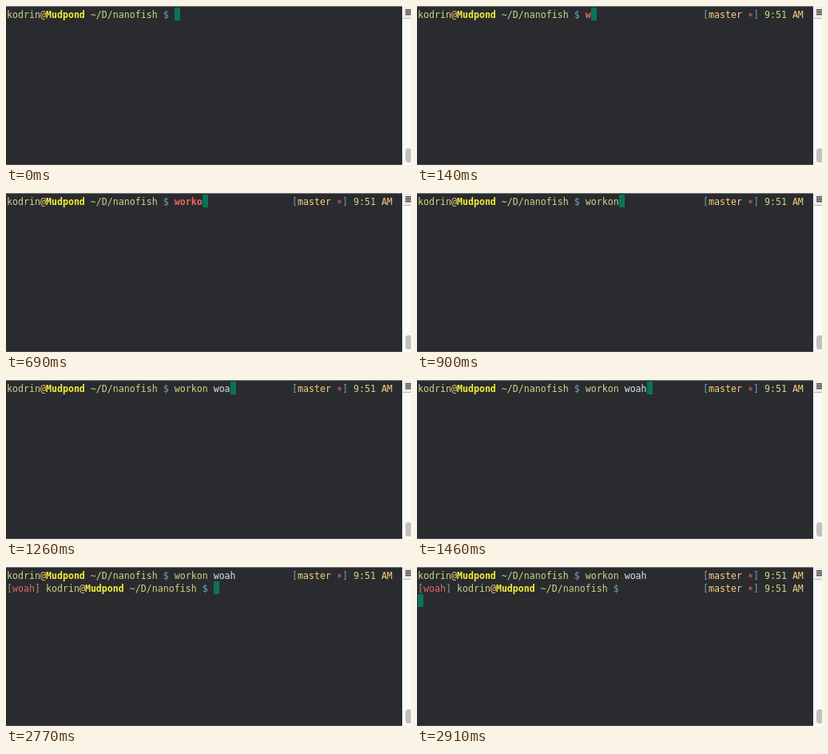
Recreate the animation shown at these times as an HTML page. Size 507 px wide and 199 px high, loop 3.6 s.

```html
<!DOCTYPE html>
<html lang="en">
<head>
<meta charset="utf-8">
<title>Terminal session</title>
<style>
  html, body { margin: 0; width: 100%; height: 100%; overflow: hidden; background: #292b2f; }
  #stage { position: relative; width: 507px; height: 199px; overflow: hidden; }
  #stage div { position: absolute; }
  .edge { left: 0; width: 497px; height: 1px; }
  .row { left: 1px; height: 16px; white-space: pre; font: 11.627px/16px "DejaVu Sans Mono", monospace; }
  .right { left: 358px; }
  #cursor { width: 7px; height: 16px; background: #0a735a; }
  .user, .time, .cmd { color: #d0d583; }
  .host { color: #f4ee38; font-weight: 700; }
  .sign, .bracket { color: #74a5b8; }
  .at, .branch { color: #fdd07c; }
  .env { color: #dc6b6b; }
  .dim { color: #a3937f; }
  .star { color: #e8645f; position: relative; top: 2px; }
  .bad { color: #f0645f; font-weight: 700; }
  .arg { color: #dde2df; }
  #scroll { left: 496px; top: 0; width: 11px; height: 199px; background: #fafafa; }
  #menu { left: 1px; top: 1px; width: 10px; height: 14px; background: #ececec; border-bottom: 1px solid #b8b8b8; }
  #menu i { position: absolute; left: 3px; width: 7px; height: 1px; background: #444; box-shadow: 0 1px #b5b5b5; }
  #thumb { left: 4px; top: 178px; width: 8px; height: 18px; border-radius: 4px; background: #c1c1c1; }
</style>
</head>
<body>
<div id="stage">
  <div class="edge" style="top:0;background:#77787a"></div>
  <div class="edge" style="top:198px;background:#51494d"></div>
  <div id="cursor"></div>
  <div class="row" id="line0" style="top:3px"></div>
  <div class="row" id="line1" style="top:19px"></div>
  <div class="row right" id="status0" style="top:3px"></div>
  <div class="row right" id="status1" style="top:19px"></div>
  <div id="scroll">
    <div id="menu"><i style="top:3px"></i><i style="top:5px"></i><i style="top:7px"></i><i style="top:9px"></i></div>
    <div id="thumb"></div>
  </div>
</div>
<script>
const LOOP = 3600, CELL = 7, ROW = 16;
const COMMAND = "workon woah";
const KEY_TIMES = [140, 440, 540, 610, 690, 840, 930, 1020, 1160, 1260, 1460];
const ENTER = 1830, READY = 2770, ENTER_AGAIN = 2910, STATUS_DELAY = 40;

const $ = id => document.getElementById(id);
const span = (name, text) => `<span class="${name}">${text}</span>`;

const prompt = span("user", "kodrin") + span("at", "@") + span("host", "Mudpond") +
  span("user", " ~/D/nanofish ") + span("sign", "$ ");
const status = span("bracket", "[") + span("branch", "master ") + span("star", "*") +
  span("bracket", "] ") + span("time", "9:51 ") + span("branch", "AM");

$("line1").innerHTML = span("dim", "[") + span("env", "woah") + span("dim", "] ") + prompt;
$("status0").innerHTML = $("status1").innerHTML = status;

function show(id, visible) {
  $(id).style.visibility = visible ? "visible" : "hidden";
}

function cursorCell(t, typed) {
  if (t >= ENTER_AGAIN) return [0, 2];
  if (t >= READY) return [37, 1];
  if (t >= ENTER) return [0, 1];
  return [30 + typed, 0];
}

let shown = -1;
function draw(now) {
  const t = now % LOOP;
  const typed = KEY_TIMES.filter(k => t >= k).length;
  if (typed !== shown) {
    const word = COMMAND.slice(0, Math.min(typed, 6));
    $("line0").innerHTML = prompt + span(typed < 6 ? "bad" : "cmd", word) +
      span("arg", COMMAND.slice(6, Math.max(typed, 6)));
    shown = typed;
  }
  show("status0", t >= STATUS_DELAY);
  show("line1", t >= READY);
  show("status1", t >= READY + STATUS_DELAY);
  const [col, row] = cursorCell(t, typed);
  $("cursor").style.left = 1 + col * CELL + "px";
  $("cursor").style.top = 2 + row * ROW + "px";
}

function tick() {
  draw(performance.now());
  requestAnimationFrame(tick);
}
tick();
</script>
</body>
</html>
```
